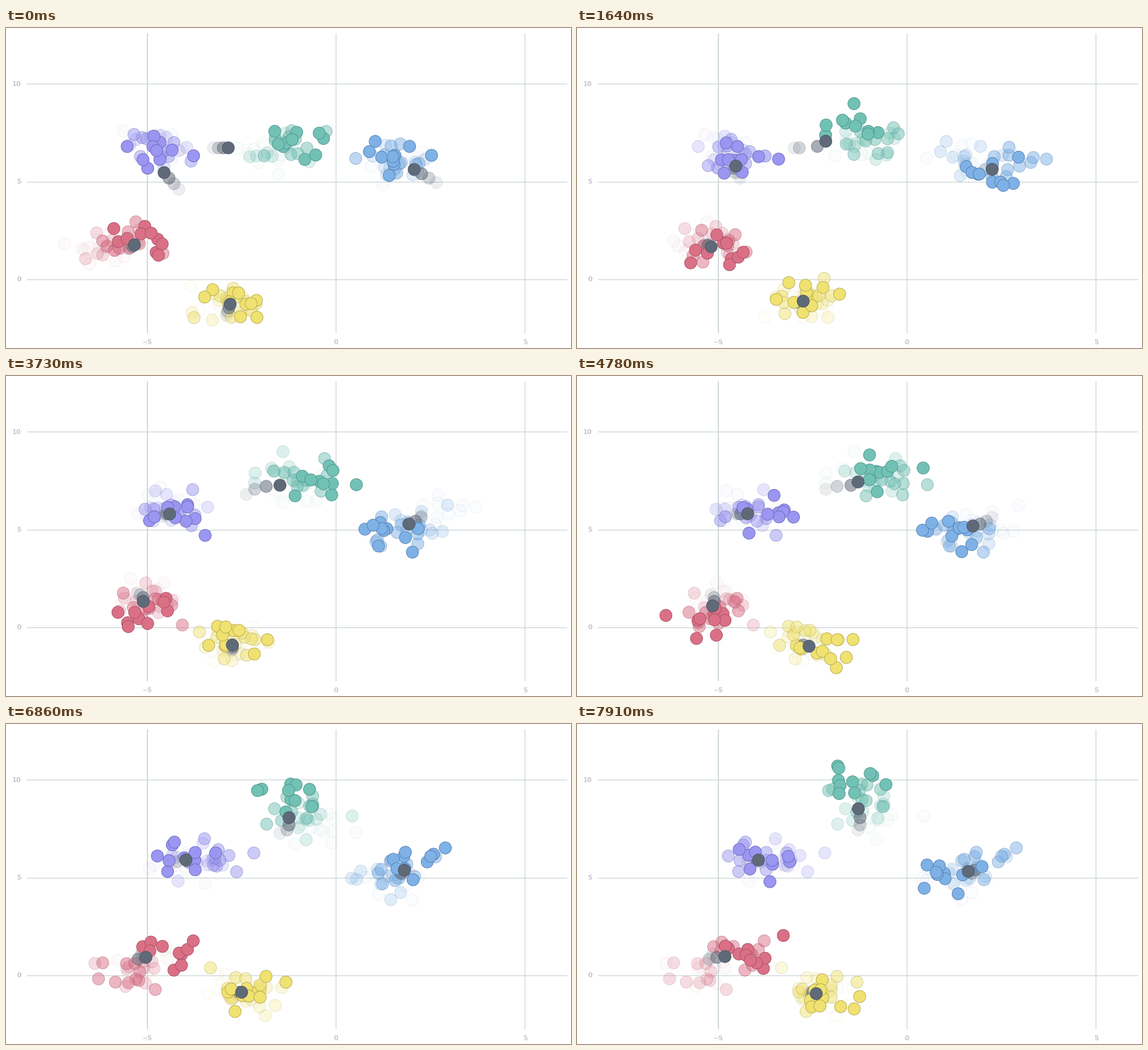
A matplotlib script for the animation above (8 s loop, 915x518 px).

```python
import numpy as np
import matplotlib.pyplot as plt
from matplotlib.animation import FuncAnimation
from matplotlib.colors import to_rgb

W, H, DPI = 915, 518, 100
PX = 72 / DPI                 # points per pixel
LOOP, STEP = 8000, 20         # ms

BATCHES, PER_BATCH = 12, 10
FIRST = 3                     # newest batch when the loop begins
ARRIVAL, PERIOD, FADE = 290, 1045, 300   # ms: first arrival, gap, fade-in
FADE_STEPS = 3

DOT = 19.7                    # dot diameter in pixels
SPREAD = (27, 14.5)           # of the points in one batch, in pixels
GAIN = 0.24                   # pull of a new batch on its cluster centre

GRID, LABEL = "#c3ced1", "#c5c8ce"
DARK, DARK_EDGE = "#5f6a79", "#4b5462"

# Opacity against age in batches.
AGES = [-1, 0, 1, 2, 3, 4]
POINT_FADE = [0, 1, 0.5, 0.24, 0.03, 0]
EDGE_FADE = [0, 1, 0.5, 0.25, 0.09, 0]
CENTRE_FADE = [0, 1, 0.55, 0.28, 0.11, 0]

# start: the centre when the loop begins; drift: its earlier move per batch;
# keys: (batch, x, y) turning points of the drifting source of the points.
CLUSTERS = [
    dict(fill="#9a96f1", edge="#6d69bd", start=(256, 234), drift=(-8, -9),
         keys=[(0, 250, 185), (3, 244, 200), (5, 263, 212), (7, 279, 226),
               (9, 346, 217), (10, 286, 215), (11, 302, 221)]),
    dict(fill="#72c1b5", edge="#4b958a", start=(360, 194), drift=(8, 0),
         keys=[(0, 422, 205), (2, 462, 186), (4, 482, 184), (5, 446, 157),
               (7, 514, 171), (9, 469, 138), (11, 447, 91)]),
    dict(fill="#7eb1e6", edge="#5580b2", start=(661, 229), drift=(-12, -7),
         keys=[(0, 640, 225), (3, 627, 208), (4, 709, 218), (6, 634, 255),
               (8, 605, 253), (10, 663, 221), (11, 597, 245)]),
    dict(fill="#da7086", edge="#a84f63", start=(208, 351), drift=(3, -2),
         keys=[(0, 145, 358), (3, 222, 342), (6, 237, 373), (9, 197, 407),
               (10, 266, 369), (11, 281, 372)]),
    dict(fill="#f0e270", edge="#b5a84c", start=(363, 447), drift=(2, -6),
         keys=[(0, 350, 450), (3, 374, 443), (7, 366, 424), (8, 405, 444),
               (9, 383, 424), (11, 406, 444)]),
]

rng = np.random.default_rng(7)


def source_path(keys):
    """Mean position of the points of every batch."""
    k, x, y = np.transpose(keys)
    b = np.arange(BATCHES)
    return np.column_stack([np.interp(b, k, x), np.interp(b, k, y)])


def centre_path(start, drift, means):
    """Steady drift up to the start, then each batch pulls the centre along."""
    start, drift = np.array(start, float), np.array(drift)
    path = [start + drift * (b - FIRST) for b in range(FIRST + 1)]
    for mean in means[FIRST + 1:]:
        path.append(path[-1] + GAIN * (mean - path[-1]))
    return path


def scatter_points(mean):
    """Random points with exactly this mean and the common spread."""
    z = rng.standard_normal((PER_BATCH, 2))
    return mean + SPREAD * (z - z.mean(axis=0)) / z.std(axis=0)


def build_dots():
    """All dots from oldest to newest, each batch topped by its centres."""
    dots = []

    def add(pos, face, line, b, is_centre):
        dots.append((pos, to_rgb(face), to_rgb(line), b, is_centre))

    sources = [source_path(c["keys"]) for c in CLUSTERS]
    centres = [centre_path(c["start"], c["drift"], means)
               for c, means in zip(CLUSTERS, sources)]
    for b in range(BATCHES):
        for c, means in zip(CLUSTERS, sources):
            for pos in scatter_points(means[b]):
                add(pos, c["fill"], c["edge"], b, False)
        for path in centres:
            add(path[b], DARK, DARK_EDGE, b, True)
    return [np.array(column) for column in zip(*dots)]


def clock(t):
    """Index of the newest batch; rises in steps while it fades in."""
    count, since = divmod(t - ARRIVAL, PERIOD)
    done = (1 + since // (FADE / (FADE_STEPS - 1))) / FADE_STEPS
    return FIRST + count + min(done, 1)


fig = plt.figure(figsize=(W / DPI, H / DPI), dpi=DPI, facecolor="white")
ax = fig.add_axes([0, 0, 1, 1])
ax.set(xlim=(0, W), ylim=(H, 0))
ax.axis("off")

line_style = dict(color=GRID, snap=False, solid_capstyle="butt", zorder=1)
text_style = dict(color=LABEL, family="DejaVu Sans", weight="bold",
                  fontsize=10.6 * PX, va="center")
for x, name, width in [(229, "\u22125", 1.5), (534.5, "0", 1), (840.5, "5", 1)]:
    ax.plot([x, x], [9, 494], lw=width * PX, **line_style)
    ax.text(x, 508.5, name, ha="center", **text_style)
for y, name in [(90.5, "10"), (249.5, "5"), (407.5, "0")]:
    ax.plot([34, 909], [y, y], lw=PX, **line_style)
    ax.text(24.5, y, name, ha="right", **text_style)

xy, fill, edge, batch, is_centre = build_dots()
dots = ax.scatter([], [], s=(DOT * PX) ** 2, linewidths=0.9 * PX, zorder=2)


def draw(i):
    age = clock(i * STEP + STEP / 2) - batch
    dark = np.interp(age, AGES, CENTRE_FADE)
    face_a = np.where(is_centre, dark, np.interp(age, AGES, POINT_FADE))
    edge_a = np.where(is_centre, dark, np.interp(age, AGES, EDGE_FADE))
    seen = edge_a > 0
    dots.set_offsets(xy[seen])
    dots.set_facecolors(np.column_stack([fill, face_a])[seen])
    dots.set_edgecolors(np.column_stack([edge, edge_a])[seen])
    return [dots]


anim = FuncAnimation(fig, draw, frames=LOOP // STEP, interval=STEP,
                     repeat=True, repeat_delay=0)
plt.show()
```
